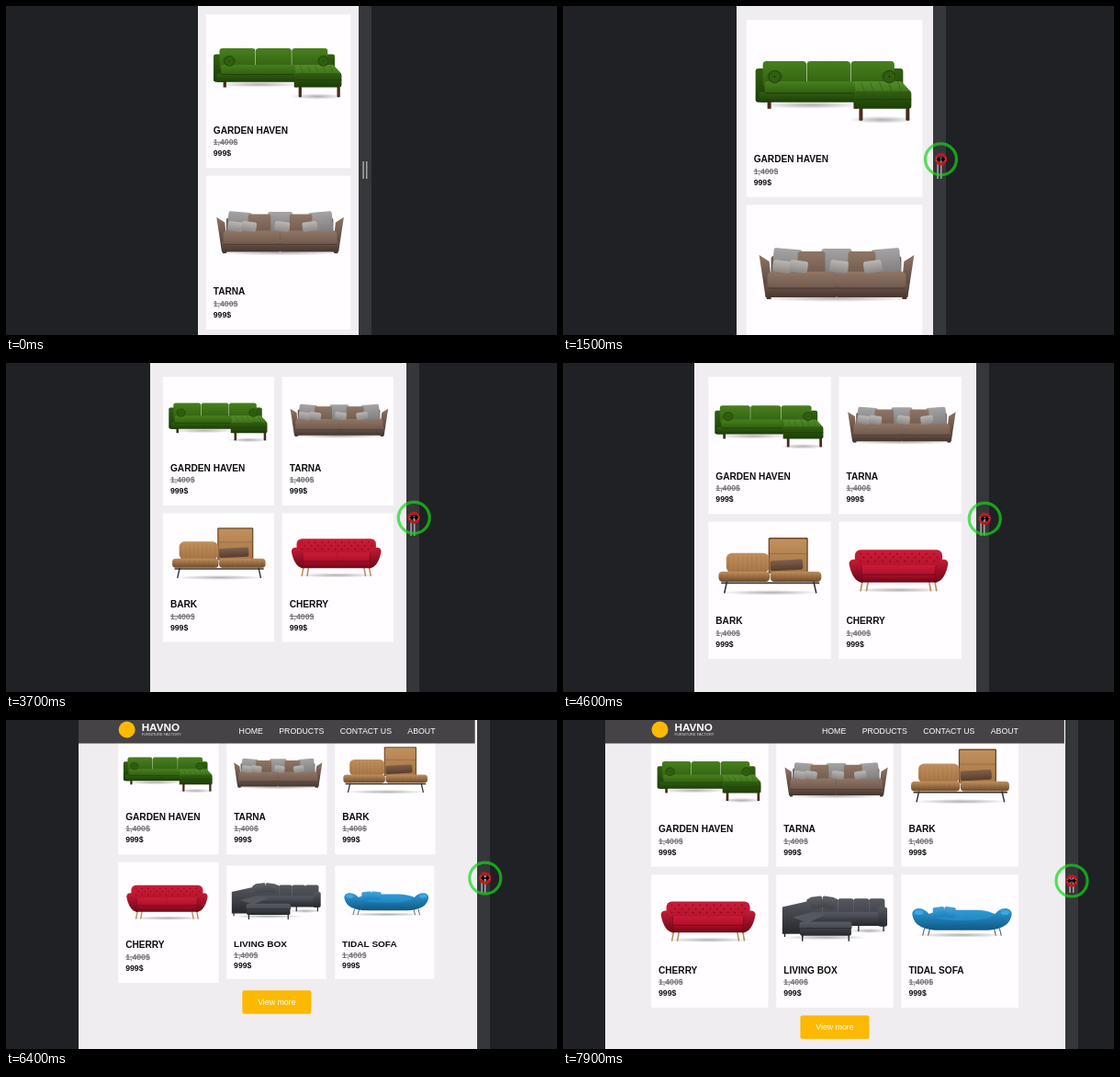
An HTML page with a canvas that plays this animation: 600x358 px, repeating every 8000 ms.

```html
<!DOCTYPE html>
<html lang="en">
<head>
<meta charset="utf-8">
<title>Responsive furniture shop</title>
<style>
html, body { margin: 0; width: 100%; height: 100%; overflow: hidden; background: #1f2125; }
canvas { display: block; width: 600px; height: 358px; }
</style>
</head>
<body>
<canvas id="stage"></canvas>
<script>
const W = 600, H = 358, LOOP = 8000, STEP = 100;
const MID = 296.5, GAP = 8.7, ROW_GAP = 8.4;
const TWO_COLS = 2100, THREE_COLS = 5850;
const SANS = '"Liberation Sans", Arial, sans-serif';

const canvas = document.getElementById('stage');
const ratio = window.devicePixelRatio || 1;
canvas.width = W * ratio;
canvas.height = H * ratio;
const c = canvas.getContext('2d');

// Pulls of the resize handle: time and half of the viewport width.
const pulls = [
  [450, 87.5], [1800, 112.5], [2700, 134.5], [3700, 139.5],
  [4600, 153.5], [5700, 184.5], [6400, 217], [7900, 250.5]
];

const mix = (a, b, k) => a + (b - a) * k;
const ramp = (t, from, to) => Math.min(1, Math.max(0, (t - from) / (to - from)));

function halfAt(t) {
  let half = pulls[0][1];
  for (let i = 1; i < pulls.length; i++) {
    const [t0, a] = pulls[i - 1], [t1, b] = pulls[i];
    half += (b - a) * ramp(t, t0, t1);
  }
  return half;
}

function shade(y, h, light, dark) {
  const g = c.createLinearGradient(0, y, 0, y + h);
  g.addColorStop(0, light);
  g.addColorStop(1, dark);
  return g;
}

function box(color, x, y, w, h, r = 0) {
  c.fillStyle = color;
  c.beginPath();
  c.roundRect(x, y, w, h, r);
  c.fill();
}

function pad(x, y, w, h, r, light, dark) {
  box(shade(y, h, light, dark), x, y, w, h, r);
}

function poly(color, ...p) {
  c.fillStyle = color;
  c.beginPath();
  for (let i = 0; i < p.length; i += 2) c.lineTo(p[i], p[i + 1]);
  c.fill();
}

function line(color, width, x0, y0, x1, y1) {
  c.strokeStyle = color;
  c.lineWidth = width;
  c.beginPath();
  c.moveTo(x0, y0);
  c.lineTo(x1, y1);
  c.stroke();
}

function disc(color, x, y, rx, ry = rx) {
  c.fillStyle = color;
  c.beginPath();
  c.ellipse(x, y, rx, ry, 0, 0, 7);
  c.fill();
}

function ring(color, width, x, y, r) {
  c.strokeStyle = color;
  c.lineWidth = width;
  c.beginPath();
  c.arc(x, y, r, 0, 7);
  c.stroke();
}

function pillow(x, y, w, h, tilt, light, dark) {
  c.save();
  c.translate(x + w / 2, y + h / 2);
  c.rotate(tilt);
  pad(-w / 2, -h / 2, w, h, 3, light, dark);
  c.restore();
}

function floorShadow(x, y, rx) {
  c.save();
  c.translate(x, y);
  c.scale(rx, 4);
  const g = c.createRadialGradient(0, 0, 0, 0, 0, 1);
  g.addColorStop(0, 'rgba(60,55,55,.4)');
  g.addColorStop(1, 'rgba(60,55,55,0)');
  disc(g, 0, 0, 1);
  c.restore();
}

function row(n, x, step, draw) {
  for (let i = 0; i < n; i++) draw(x + i * step, i);
}

// Draws a part and its mirror image about x = axis.
function both(axis, draw) {
  draw();
  c.save();
  c.translate(axis * 2, 0);
  c.scale(-1, 1);
  draw();
  c.restore();
}

function text(s, x, y, size, color, bold, align = 'left') {
  c.font = (bold ? 'bold ' : '') + size + 'px ' + SANS;
  c.fillStyle = color;
  c.textAlign = align;
  c.fillText(s, x, y);
  return c.measureText(s).width;
}

// Each sofa is drawn on a card 192 units wide.
function greenSofa() {
  const lite = '#47801d', mid = '#315f10', dark = '#1c3d07';
  floorShadow(70, 93, 56);
  floorShadow(148, 109, 36);
  row(2, 23, 94, x => box('#4b2a1c', x, 88, 4, 9));
  row(2, 123, 51, x => box('#4b2a1c', x, 96, 4, 14, 1));
  both(90.5, () => pad(10, 53, 18, 37, 3, mid, dark));
  row(3, 18, 48, x => pad(x, 45, 47.5, 28, 4, lite, mid));
  pad(20, 67, 100, 13, 3, lite, mid);
  pad(14, 79, 105, 11, 2, mid, dark);
  line(dark, 1, 20, 80, 118, 80);
  poly(shade(67, 13, '#548c29', '#3c731a'), 118, 67, 169, 67, 180, 79, 119, 79);
  pad(118, 78, 62, 19, 3, mid, dark);
  line(dark, .8, 119, 87, 180, 87);
  row(5, 125, 10, x => line(mid, .7, x, 68, x + 4, 78));
  both(93.5, () => {
    disc(mid, 31, 62, 8.5, 7);
    ring(dark, .8, 31, 62, 6.5);
    disc(dark, 31, 62, 1);
  });
}

function brownSofa() {
  const lite = '#8f7666', mid = '#705a4e', dark = '#47362f';
  const grey = ['#a5a3a3', '#7d7b7b'], soft = ['#bab7b5', '#8c8886'];
  floorShadow(98, 102, 86);
  pad(27, 56, 142, 30, 3, mid, dark);
  pillow(82, 48, 33, 28, 0, ...grey);
  both(98.5, () => {
    pillow(29, 48, 31, 29, .08, ...grey);
    pillow(56, 51, 30, 26, 0, lite, mid);
    poly(shade(54, 46, lite, dark), 14, 55, 25, 62, 29, 101, 21, 101);
    box(dark, 22, 100, 5, 3);
    pad(21, 86, 78, 15, 2, mid, dark);
    pad(23, 73, 75.5, 18, 5, lite, mid);
    line(dark, 1, 24, 91, 98, 91);
  });
  for (const x of [29, 47, 91, 128]) pillow(x, 61, 20, 13, x < 120 ? .14 : -.14, ...soft);
}

function tanSofa() {
  const lite = '#c0905e', mid = '#a67545', dark = '#6f4a28', iron = '#37302c';
  floorShadow(98, 111, 78);
  both(97, () => line(iron, 2.2, 29, 94, 25, 112));
  line(iron, 2.4, 20, 96, 174, 96);
  pad(94, 25, 62, 56, 2, dark, dark);
  pad(96, 27, 58, 54, 2, lite, mid);
  line(dark, .6, 97, 50, 154, 50);
  pad(28, 49, 67, 31, 9, lite, mid);
  row(2, 16, 81, x => pad(x, 78, 80, 16, 6, lite, dark));
  c.globalAlpha = .25;
  row(9, 32, 7.2, x => line(dark, .8, x, 53, x, 77));
  row(19, 21, 8.3, x => line(dark, .8, x + 1, 80, x - 1, 91));
  c.globalAlpha = 1;
  pillow(97, 60, 51, 16, -.05, '#7f5f49', '#573d2f');
}

function redSofa() {
  const lite = '#c91c37', mid = '#ae1029', dark = '#6f0818';
  floorShadow(94, 107, 70);
  both(93.5, () => row(2, 37, 9, x => line('#b88d5d', 2.4, x, 92, x - 3, 109)));
  pad(25, 44, 137, 38, 9, lite, mid);
  row(33, 0, 1, i => disc(dark, 34 + i % 11 * 11.5 + (i > 10 && i < 22 ? 5 : 0), 50 + Math.floor(i / 11) * 6, 1.1));
  pad(32, 81, 123, 14, 3, mid, dark);
  row(2, 34, 60, x => pad(x, 68, 59.5, 15, 4, lite, mid));
  line(dark, 1.2, 34, 83, 153, 83);
  both(93.5, () => {
    c.fillStyle = shade(58, 36, lite, dark);
    c.beginPath();
    c.moveTo(37, 95);
    c.bezierCurveTo(24, 95, 18, 78, 16, 66);
    c.bezierCurveTo(16, 56, 31, 57, 35, 68);
    c.lineTo(37, 95);
    c.fill();
    line(dark, .9, 35, 68, 37, 95);
  });
}

function greySofa() {
  const lite = '#565860', mid = '#414349', dark = '#26282c', black = '#1b1c1f';
  floorShadow(80, 103, 70);
  floorShadow(152, 92, 32);
  row(2, 13, 29, x => box(black, x, 94, 2, 8));
  row(2, 42, 76, x => box(black, x, 98, 2, 11));
  row(2, 134, 41, x => box(black, x, 82, 2, 11));
  row(5, 50, 25.5, x => pad(x, 39, 26, 28, 4, lite, mid));
  pad(54, 61, 124, 12, 4, lite, mid);
  pad(54, 71, 126, 13, 3, mid, dark);
  pad(167, 53, 15, 32, 4, lite, dark);
  poly(shade(42, 54, lite, dark), 10, 53, 50, 44, 57, 50, 56, 84, 40, 97, 10, 97);
  poly(lite, 26, 70, 55, 62, 80, 66, 52, 79);
  row(2, 55, 20, (x, i) => pillow(x, 36, 21, 19, i ? .14 : -.12, '#5f6168', mid));
  pad(38, 77, 86, 14, 5, '#5a5c63', mid);
  pad(39, 87, 84, 13, 3, mid, dark);
  line(black, .8, 39, 88, 123, 88);
}

function blueSofa() {
  const lite = '#2f9ad6', mid = '#1b80bd', dark = '#0e5684';
  floorShadow(98, 99, 76);
  both(99.5, () => row(2, 38, 9, x => line('#55585c', 1.6, x, 88, x - 3, 100)));
  both(99.5, () => {
    c.fillStyle = shade(57, 26, lite, mid);
    c.beginPath();
    c.moveTo(30, 74);
    c.bezierCurveTo(52, 55, 76, 58, 100, 58);
    c.lineTo(100, 84);
    c.lineTo(42, 84);
    c.fill();
  });
  row(2, 52, 18, (x, i) => pillow(x, 53, 19, 17, i ? .12 : -.1, '#41a5dc', mid));
  both(99.5, () => {
    c.fillStyle = shade(56, 36, lite, dark);
    c.beginPath();
    c.moveTo(18, 65);
    c.bezierCurveTo(18, 53, 36, 52, 45, 64);
    c.bezierCurveTo(54, 74, 78, 75, 100, 75);
    c.lineTo(100, 91);
    c.lineTo(62, 91);
    c.bezierCurveTo(34, 91, 20, 81, 18, 65);
    c.fill();
    disc('#3fa6de', 29, 62, 7, 4);
  });
}

const goods = [
  ['GARDEN HAVEN', greenSofa], ['TARNA', brownSofa], ['BARK', tanSofa],
  ['CHERRY', redSofa], ['LIVING BOX', greySofa], ['TIDAL SOFA', blueSofa]
];

function card([name, draw], x, y, w, h, shown) {
  c.save();
  // Tilts upright while fading in.
  const tilt = Math.PI / 3 * Math.pow(1 - shown, 1.5);
  c.globalAlpha = Math.min(1, shown * 2.5);
  c.translate(x, y + h / 2);
  c.scale(1 - tilt * .03, Math.cos(tilt));
  c.translate(0, -h / 2);
  box('#fffdff', 0, 0, w, h);
  text(name, 8, h - 37.5, 10.15, '#0d0d0d', true);
  const wide = text('1,400$', 8, h - 25, 8.7, '#77757a', true);
  box('#77757a', 8, h - 28.5, wide, 1);
  text('999$', 8, h - 13, 8.7, '#111', true);
  c.scale(w / 192, w / 192);
  if (shown > 0) draw();
  c.restore();
}

function header(x, w, left, right) {
  box('#454346', x, 0, w, 25.5);
  disc('#fcb900', left + 9.5, 10.5, 9);
  text('HAVNO', left + 25.5, 11.8, 11.7, '#fff', true);
  text('FURNITURE FACTORY', left + 25.5, 17, 4, '#ddd');
  for (const item of ['ABOUT', 'CONTACT US', 'PRODUCTS', 'HOME'])
    right -= text(item, right, 15, 8.75, '#fff', false, 'right') + 17.4;
}

function cursor(x, y) {
  ring('rgba(20,215,25,.7)', 3.2, x, y, 17);
  ring('#c8141c', 3, x, y, 5.2);
  line('#fff', 2.6, x - 5, y, x + 5, y);
  both(x, () => poly('#000', x, y - .7, x - 2.5, y - 2.5, x - 5.5, y, x - 2.5, y + 2.5, x, y + .7));
}

function render(t) {
  c.setTransform(ratio, 0, 0, ratio, 0, 0);
  box('#1f2125', 0, 0, W, H);

  const half = halfAt(t), x = Math.floor(MID - half), edge = Math.floor(MID + half);
  const grip = edge + 7;
  box('#36373a', edge, 0, 14, H);
  row(2, grip - 2.7, 3.6, bar => box('#a3a3a3', bar, 169, 1.6, 19));

  // The page layout trails the viewport a little.
  const pw = halfAt(t - 25) * 2;
  const cols = t < TWO_COLS ? 1 : t < THREE_COLS ? 2 : 3;
  const margin = pw * (cols === 3 ? .1 : .05);
  const w = (pw - margin * 2 - GAP * (cols - 1)) / cols;
  const h = w * .747 + 49.6;
  const top = mix(9, 15, ramp(t, 300, 900));

  c.save();
  c.beginPath();
  c.rect(x, 0, edge - x, H);
  c.clip();
  box('#efedf0', x, 0, edge - x, H);
  goods.slice(0, cols * 2).forEach((item, i) => {
    const born = [-LOOP, TWO_COLS, THREE_COLS][i >> 1];
    const left = x + margin + i % cols * (w + GAP);
    card(item, left, top + Math.floor(i / cols) * (h + ROW_GAP), w, h, ramp(t, born, born + 1050));
  });
  if (cols === 3) {
    const y = top + (h + ROW_GAP) * 2, mid = x + pw / 2;
    box('#fcb900', mid - 37.5, y, 75, 25.5, 2);
    text('View more', mid, y + 16, 8.8, '#fff', false, 'center');
    box('#fff', x + pw, 0, edge - x, 25.5);
    header(x, pw, x + margin, x + pw - margin);
  }
  c.restore();

  if (t >= 100) {
    const reach = ramp(t, 100, 450);
    const lead = grip + halfAt(t + 80) - half;
    cursor(mix(571, lead, reach), mix(226, 166.5 + 8.5 * (t / 7900) ** 2, reach));
  }
}

const start = performance.now();
function tick(now) {
  const t = Math.max(0, now - start) % LOOP;
  render(Math.floor(t / STEP) * STEP);
  requestAnimationFrame(tick);
}
render(0);
requestAnimationFrame(tick);
</script>
</body>
</html>
```
